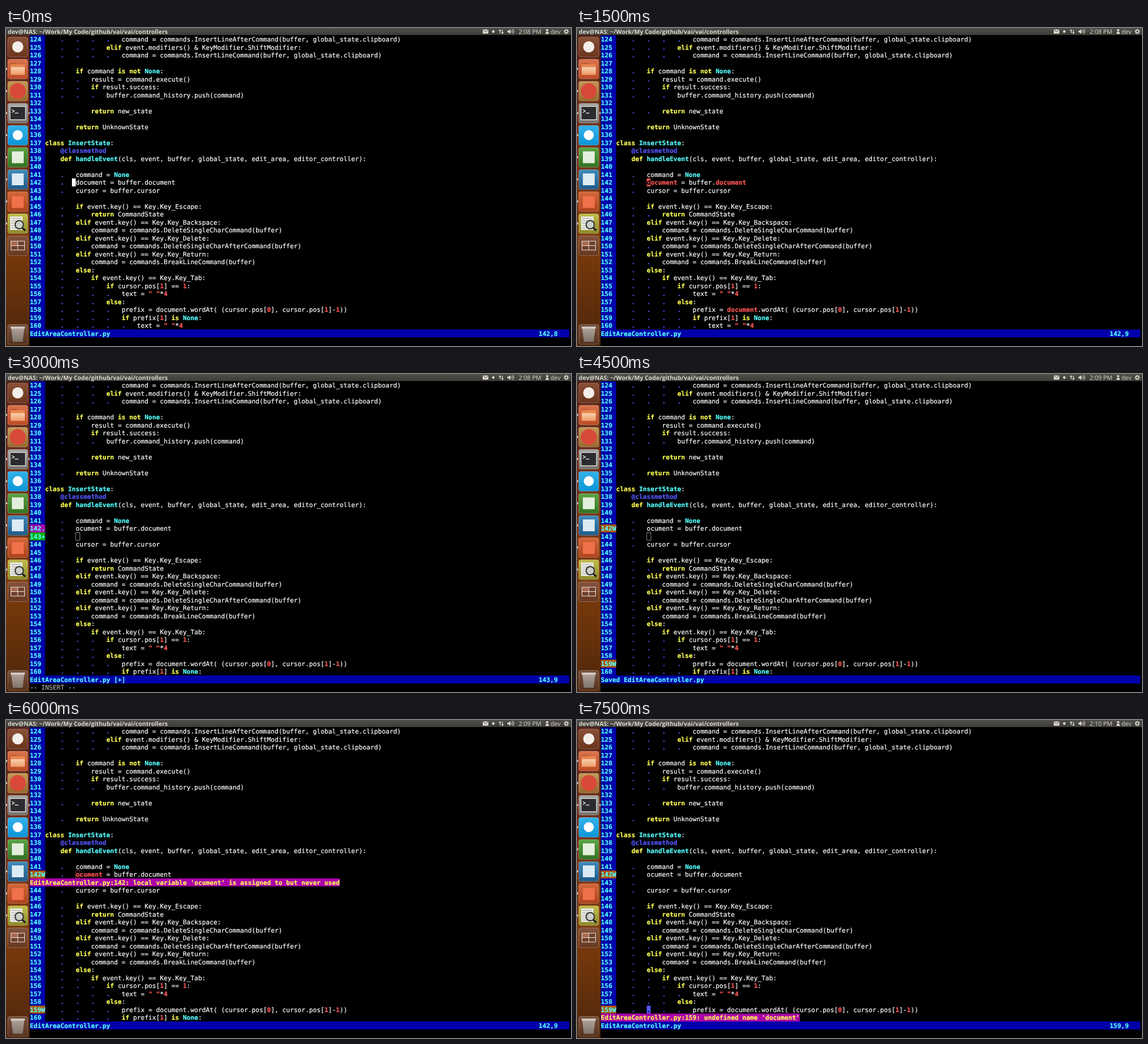
Recreate the animation shown at these times as an HTML page with a canvas. Size 960x540 px, loop 9000 ms.

```html
<!DOCTYPE html>
<html lang="en">
<head>
<meta charset="utf-8">
<title>Terminal editor with live linting</title>
<style>
  html, body { margin: 0; width: 100%; height: 100%; overflow: hidden; background: #000; }
  canvas { display: block; }
</style>
</head>
<body>
<canvas id="stage" width="960" height="540"></canvas>
<script>
const ctx = document.getElementById('stage').getContext('2d');

const CELL_W = 6.5, CELL_H = 13.5, LEFT = 40.5, TOP = 12.5, BASELINE = 10.5;
const PANEL_H = 12;
const FIRST_LINE = 124, ROWS = 37, GUTTER = 4, COLUMNS = 141;
const MONO = '10.8px "DejaVu Sans Mono", monospace';
const PANEL = '10.3px "Open Sans", sans-serif';
const PANEL_BOLD = 'bold 10.15px "Open Sans", sans-serif';
const WHITE = '#fff', CYAN = '#55ffff', YELLOW = '#ffff55', RED = '#ff5555', BLUE = '#5555ff';
const NAVY = '#0000aa', MAGENTA = '#aa00aa', GREEN = '#00aa00', ORANGE = '#aa5500';
const FILE = 'EditAreaController.py';

const code = `                    command = commands.InsertLineAfterCommand(buffer, global_state.clipboard)
                elif event.modifiers() & KeyModifier.ShiftModifier:
                    command = commands.InsertLineCommand(buffer, global_state.clipboard)

        if command is not None:
            result = command.execute()
            if result.success:
                buffer.command_history.push(command)

            return new_state

        return UnknownState

class InsertState:
    @classmethod
    def handleEvent(cls, event, buffer, global_state, edit_area, editor_controller):

        command = None
        document = buffer.document
        cursor = buffer.cursor

        if event.key() == Key.Key_Escape:
            return CommandState
        elif event.key() == Key.Key_Backspace:
            command = commands.DeleteSingleCharCommand(buffer)
        elif event.key() == Key.Key_Delete:
            command = commands.DeleteSingleCharAfterCommand(buffer)
        elif event.key() == Key.Key_Return:
            command = commands.BreakLineCommand(buffer)
        else:
            if event.key() == Key.Key_Tab:
                if cursor.pos[1] == 1:
                    text = " "*4
                else:
                    prefix = document.wordAt( (cursor.pos[0], cursor.pos[1]-1))
                    if prefix[1] is None:
                        text = " "*4`.split('\n');

const edited = code.slice();
edited.splice(142 - FIRST_LINE, 1, '        ocument = buffer.document', ' '.repeat(8));

const warnings = { 142: ['W', ORANGE], 159: ['W', ORANGE] };
const SCENE_MS = 1500;
const scenes = [
  { clock: '2:08', lines: code, status: FILE, position: '142,8',
    cursor: { line: 142, col: 7, color: WHITE, glyph: ' ' } },
  { clock: '2:08', lines: code, status: FILE, position: '142,9', word: 'document',
    cursor: { line: 142, col: 8, color: RED, glyph: 'd' } },
  { clock: '2:08', lines: edited, status: FILE + ' [+]', position: '143,9', mode: '-- INSERT --',
    marks: { 142: ['.', MAGENTA], 143: ['+', GREEN] },
    cursor: { line: 143, col: 8, color: WHITE } },
  { clock: '2:09', lines: edited, status: 'Saved ' + FILE, marks: warnings,
    cursor: { line: 143, col: 8, color: WHITE } },
  { clock: '2:09', lines: edited, status: FILE, position: '142,9', word: 'ocument', marks: warnings,
    cursor: { line: 142, col: 8, color: RED },
    message: [143, FILE + ":142: local variable 'ocument' is assigned to but never used"] },
  { clock: '2:10', lines: edited, status: FILE, position: '159,9', marks: warnings,
    cursor: { line: 159, col: 8, color: BLUE, glyph: '.' },
    message: [160, FILE + ":159: undefined name 'document'"] }
];

function rect(x, y, w, h, color) {
  ctx.fillStyle = color;
  ctx.fillRect(x, y, w, h);
}

function disc(x, y, r, color) {
  ctx.fillStyle = color;
  ctx.beginPath();
  ctx.arc(x, y, r, 0, Math.PI * 2);
  ctx.fill();
}

function shape(points, color) {
  ctx.fillStyle = color;
  ctx.beginPath();
  points.forEach(([x, y]) => ctx.lineTo(x, y));
  ctx.fill();
}

function line(points, color, width = 1) {
  ctx.strokeStyle = color;
  ctx.lineWidth = width;
  ctx.beginPath();
  points.forEach(([x, y]) => ctx.lineTo(x, y));
  ctx.stroke();
}

function label(text, x, y, font, color) {
  ctx.font = font;
  ctx.fillStyle = color;
  ctx.fillText(text, x, y);
}

function fade(top, bottom, ...colors) {
  const gradient = ctx.createLinearGradient(0, top, 0, bottom);
  colors.forEach((color, i) => gradient.addColorStop(i / (colors.length - 1), color));
  return gradient;
}

const cellX = col => LEFT + col * CELL_W;
const cellY = row => TOP + row * CELL_H;

function cells(col, row, count, color) {
  rect(cellX(col), cellY(row), count * CELL_W, CELL_H, color);
}

// A hairline outline gives terminal glyphs their slightly heavy weight.
function write(text, col, row, color, bold = color !== WHITE) {
  const x = cellX(col), y = cellY(row) + BASELINE;
  label(text, x, y, (bold ? 'bold ' : '') + MONO, color);
  ctx.strokeStyle = color;
  ctx.lineWidth = 0.2;
  ctx.strokeText(text, x, y);
}

const TOKENS = /@\w+|" "|\w+|[^\w@"]+/g;

function tokenColor(token, word) {
  if (token === word || /^(\d+|" ")$/.test(token)) return RED;
  if (/^(class|def|if|elif|else|return|is|not)$/.test(token)) return YELLOW;
  if (/^(None|InsertState|handleEvent)$/.test(token)) return CYAN;
  return token[0] === '@' ? BLUE : WHITE;
}

function drawCode({ lines, word, marks = {} }) {
  rect(LEFT, TOP, GUTTER * CELL_W, ROWS * CELL_H, NAVY);
  for (let row = 0; row < ROWS; row++) {
    const number = FIRST_LINE + row, source = lines[row];
    const [sign, background] = marks[number] || ['', NAVY];
    if (sign) cells(0, row, GUTTER, background);
    write(number + sign, 0, row, CYAN);

    const indent = source.search(/\S|$/);
    for (let col = 4; col < indent; col += 4) write('.', GUTTER + col, row, BLUE);
    for (const { 0: token, index } of source.matchAll(TOKENS)) {
      if (token.trim()) write(token, GUTTER + index, row, tokenColor(token, word));
    }
  }
}

function drawCursor({ line: number, col, color, glyph }) {
  const row = number - FIRST_LINE, column = GUTTER + col;
  if (glyph) {
    cells(column, row, 1, color);
    write(glyph, column, row, '#000');
  } else {
    ctx.strokeStyle = color;
    ctx.lineWidth = 0.5;
    ctx.strokeRect(cellX(column) + 0.25, cellY(row) + 0.25, CELL_W, CELL_H - 0.5);
  }
}

function drawTerminal(scene) {
  rect(40, PANEL_H, 920, 540 - PANEL_H, '#000');
  drawCode(scene);
  drawCursor(scene.cursor);
  if (scene.message) {
    const [number, text] = scene.message;
    cells(0, number - FIRST_LINE, text.length, MAGENTA);
    write(text, 0, number - FIRST_LINE, YELLOW);
  }
  cells(0, ROWS, COLUMNS, NAVY);
  write(scene.status, 0, ROWS, CYAN);
  write(scene.position || '', 133, ROWS, CYAN);
  write(scene.mode || '', 0, ROWS + 1, '#aaaaaa', false);
}

function drawPanel(clock) {
  const ink = '#dfdbd2', baseline = 9.7;
  rect(0, 0, 960, PANEL_H, fade(0, PANEL_H, '#504f4a', '#3c3b37'));
  label('dev@NAS: ~/Work/My Code/github/vai/vai/controllers', 3, baseline, PANEL_BOLD, ink);
  rect(810, 2.5, 9.5, 7, ink);
  line([[810.5, 3], [814.7, 6.5], [819, 3]], '#45443f');
  disc(828, 6, 2.2, ink);
  line([[839.5, 9], [839.5, 3]], ink, 1.2);
  line([[843.5, 3], [843.5, 9]], ink, 1.2);
  shape([[837.2, 5], [839.5, 2], [841.8, 5]], ink);
  shape([[841.2, 7.5], [843.5, 10.5], [845.8, 7.5]], ink);
  shape([[852, 4.5], [854, 4.5], [857, 2], [857, 10], [854, 7.5], [852, 7.5]], ink);
  ctx.strokeStyle = ink;
  ctx.lineWidth = 0.9;
  for (const r of [2.5, 4.5, 6.5]) {
    ctx.beginPath();
    ctx.arc(856.5, 6, r, -0.8, 0.8);
    ctx.stroke();
  }
  label(clock + ' PM', 871, baseline, PANEL, ink);
  disc(919.5, 3.7, 2, ink);
  shape([[916.5, 10], [917.5, 6.5], [921.5, 6.5], [922.5, 10]], ink);
  label('dev', 925, baseline, PANEL, ink);
  for (let i = 0; i < 8; i++) {
    const a = i * Math.PI / 4;
    line([[952, 6], [952 + 4.4 * Math.cos(a), 6 + 4.4 * Math.sin(a)]], ink, 1.3);
  }
  disc(952, 6, 3.2, ink);
  disc(952, 6, 1.7, '#45443f');
}

function tile(y, light, dark) {
  ctx.beginPath();
  ctx.roundRect(3, y - 16.5, 34, 33.5, 3.5);
  ctx.fillStyle = fade(y - 17, y + 17, light, dark);
  ctx.fill();
  ctx.strokeStyle = 'rgba(255,255,255,.3)';
  ctx.lineWidth = 0.8;
  ctx.stroke();
}

function running(y) {
  shape([[0, y - 2.5], [2.5, y], [0, y + 2.5]], '#ddd');
}

const apps = [
  ['#8a5038', '#6a351c', y => disc(20, y, 9.5, '#f4eeea')],
  ['#d9744f', '#bd4d26', y => {
    rect(8, y - 10, 11, 5, '#b9582e');
    rect(8, y - 8, 24, 17, '#e9874f');
    rect(8, y - 3, 24, 13, fade(y - 3, y + 10, '#f8d0b0', '#ee9a66'));
  }],
  ['#c59a58', '#96692f', y => disc(20, y, 13.5, '#d9493a')],
  ['#a5a5a2', '#72726f', y => {
    rect(6, y - 12, 28, 24, '#d2d2ce');
    rect(7.5, y - 10.5, 25, 21, '#2c2b30');
    line([[10, y - 6], [14, y - 3.5], [10, y - 1]], '#eee', 1.3);
    line([[15, y], [21, y]], '#eee', 1.3);
  }],
  ['#35b2ea', '#0b95d8', y => disc(20, y, 8.5, '#fff')],
  ['#5da546', '#317323', y => rect(10, y - 10, 20, 20, '#e3efdc')],
  ['#438cbb', '#205b89', y => rect(10, y - 10, 20, 20, '#dcebf4')],
  ['#d4683c', '#ad431d', y => rect(10, y - 9, 20, 20, '#f0714a')],
  ['#c2bd4b', '#8e8b2b', y => {
    rect(7, y - 12, 21, 23, '#e9e9e2');
    for (let i = 0; i < 5; i++) rect(9, y - 9 + i * 4, 16, 1, '#aaa');
    line([[27, y + 7], [33, y + 12]], '#222', 3);
    disc(22.5, y + 2, 8, '#333');
    disc(22.5, y + 2, 6, '#cbd0c8');
  }],
  ['#84533f', '#67381f', y => {
    rect(8, y - 8, 24, 16, '#eee2dc');
    rect(9, y - 7, 10.5, 6.5, '#aa664b');
    rect(20.5, y - 7, 10.5, 6.5, '#6d402c');
    rect(9, y + 0.5, 10.5, 6.5, '#6d402c');
    rect(20.5, y + 0.5, 10.5, 6.5, '#6d402c');
  }]
];

function drawTrash(y) {
  tile(y, '#79523f', '#55301d');
  shape([[9, y - 11], [31, y - 11], [28.5, y + 13], [11.5, y + 13]], fade(y - 11, y + 13, '#b7aaa0', '#776a61'));
  for (let x = 12; x < 30; x += 3) line([[x, y - 9], [20 + (x - 20) * 0.8, y + 12]], '#9c9087', 0.7);
  rect(8, y - 13, 24, 3.5, '#d3cac3');
}

function drawLauncher() {
  rect(0, PANEL_H, 40, 540 - PANEL_H, fade(PANEL_H, 540, '#552317', '#73301a', '#7c3b0c', '#4d260b'));
  apps.forEach(([light, dark, icon], i) => {
    const y = 32 + i * 37.5;
    tile(y, light, dark);
    icon(y);
    if (i > 0 && i < 9) running(y);
  });
  shape([[40, 142], [37.5, 144.5], [40, 147]], '#ddd');
  drawTrash(520);
}

function draw(now) {
  const scene = scenes[Math.floor(now / SCENE_MS) % scenes.length];
  ctx.textRendering = 'geometricPrecision';
  drawLauncher();
  drawTerminal(scene);
  drawPanel(scene.clock);
}

let start;
function tick(now) {
  start ??= now;
  draw(now - start);
  requestAnimationFrame(tick);
}
requestAnimationFrame(tick);
</script>
</body>
</html>
```
